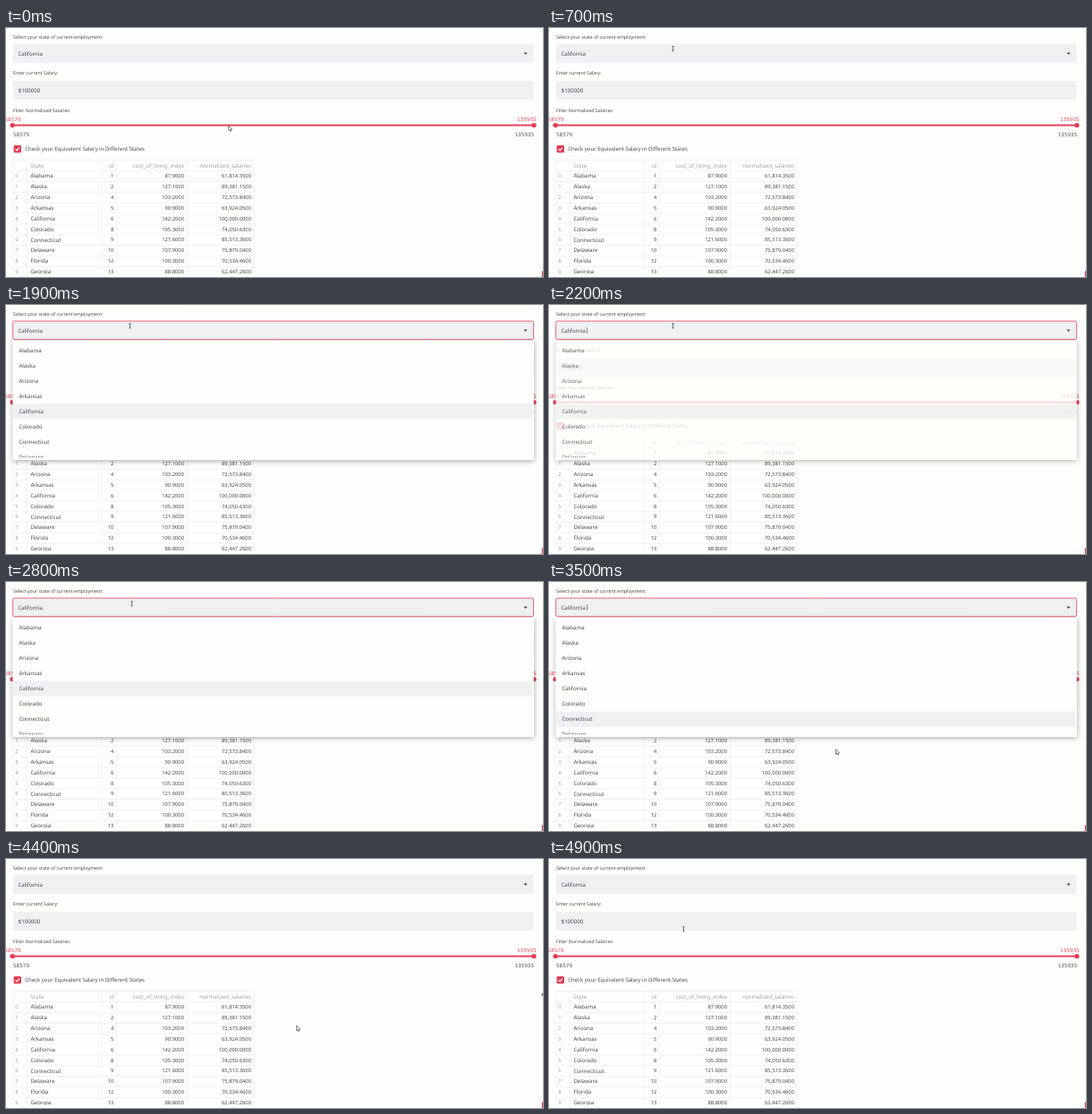
An HTML page with a canvas that plays this animation: 600x278 px, repeating every 5 s.

```html
<!DOCTYPE html>
<html lang="en">
<head>
<meta charset="utf-8">
<title>Salary comparison form</title>
<style>
  html, body { margin: 0; width: 100%; height: 100%; overflow: hidden; background: #fefefc; }
  canvas { display: block; width: 600px; height: 278px; }
</style>
</head>
<body>
<canvas id="stage" width="600" height="278"></canvas>
<script>
const ctx = document.getElementById('stage').getContext('2d');
ctx.textRendering = 'geometricPrecision';

const W = 600, H = 278, LOOP = 5000, STEP = 100;
const SANS = '"Noto Sans", "Open Sans", sans-serif';
const MONO = '"Noto Sans Mono", "DejaVu Sans Mono", monospace';
const PAGE = '#fefefc', FIELD = '#eef0f2', INK = '#484a52', FAINT = '#a0a2a7';
const LINE = '#ebecee', RED = '#e63c56';

const states = [
  ['Alabama', 1, 87.9], ['Alaska', 2, 127.1], ['Arizona', 4, 103.2],
  ['Arkansas', 5, 90.9], ['California', 6, 142.2], ['Colorado', 8, 105.3],
  ['Connecticut', 9, 121.6], ['Delaware', 10, 107.9], ['Florida', 12, 100.3],
  ['Georgia', 13, 88.8]
];
const BASE_INDEX = 142.2, SALARY = 100000, CHOSEN = 4;

// Pointer path: time, x, y
const path = [
  [0, 250, 112], [600, 138.6, 23], [2500, 138.6, 23], [2800, 140.7, 24], [2900, 146, 32],
  [3000, 165, 119], [3100, 165, 119], [3600, 340, 198], [4300, 340, 198], [4900, 150.4, 78]
];
// Menu opacity from each time on
const menuFade = [
  [0, 0], [900, 0.15], [1000, 0.6], [1100, 0.9], [1200, 1],
  [2100, 0.4], [2200, 0.8], [2300, 1], [3800, 0]
];
const MENU = { x: 7.6, y: 40, w: 582, h: 133, first: 50.5, pitch: 17.1 };

const within = (t, a, b) => t >= a && t < b;

function pointerAt(t) {
  const i = path.findIndex(p => p[0] > t);
  if (i < 0) return path[path.length - 1].slice(1);
  const [t0, x0, y0] = path[i - 1], [t1, x1, y1] = path[i];
  const u = (t - t0) / (t1 - t0), k = u * u * (3 - 2 * u);
  return [x0 + (x1 - x0) * k, y0 + (y1 - y0) * k];
}

function fadeAt(t) {
  return menuFade.filter(f => f[0] <= t).pop()[1];
}

function rect(x, y, w, h, color) {
  ctx.fillStyle = color;
  ctx.fillRect(x, y, w, h);
}

function rounded(x, y, w, h, r) {
  ctx.beginPath();
  ctx.roundRect(x, y, w, h, r);
}

function poly(points, color) {
  ctx.beginPath();
  points.forEach(([x, y]) => ctx.lineTo(x, y));
  ctx.closePath();
  ctx.fillStyle = color;
  ctx.fill();
}

// y is the middle of the capitals
function text(str, x, y, { size = 6.1, color = INK, align = 'left', font = SANS } = {}) {
  ctx.font = `${size}px ${font}`;
  ctx.textAlign = align;
  ctx.fillStyle = color;
  ctx.fillText(str, x, y + size * 0.36);
}

function field(y, h) {
  rounded(7.6, y, 582, h, 1.5);
  ctx.fillStyle = FIELD;
  ctx.fill();
}

function drawSelect(t) {
  text('Select your state of current employment:', 8, 9.7, { size: 5.26 });
  rect(0, 0, 200, 7.6, PAGE);
  field(17.8, 20.9);
  if (within(t, 900, 3900)) {
    ctx.globalAlpha = t >= 3800 ? 0.4 : 0.85;
    rounded(7.7, 18, 581.8, 20.4, 1.5);
    ctx.strokeStyle = RED;
    ctx.lineWidth = 0.9;
    ctx.stroke();
    ctx.globalAlpha = 1;
  }
  text('California', 13.4, 28.5);
  poly([[578.5, 27.6], [582.5, 27.6], [580.5, 29.8]], '#33353d');
  const caret = within(t, 900, 1500) || within(t, 2100, 2600) || within(t, 3200, 3800);
  if (caret) rect(42, 25, 0.6, 7, INK);
}

function drawSlider() {
  const mono = { size: 6, font: MONO };
  text('Filter Normalized Salaries:', 8, 91.8, { size: 5.26 });
  rect(7, 107.6, 583, 1.9, RED);
  for (const x of [7.2, 589.8]) {
    ctx.beginPath();
    ctx.arc(x, 108.6, 2.7, 0, 7);
    ctx.fillStyle = RED;
    ctx.fill();
  }
  text('58579', 7.5, 101.7, { ...mono, color: RED, align: 'center' });
  text('135935', 581.8, 101.7, { ...mono, color: RED, align: 'center' });
  text('58579', 8, 118.4, mono);
  text('135935', 590, 118.4, { ...mono, align: 'right' });
}

function drawCheckbox() {
  rounded(8.6, 131, 8.4, 8.2, 1.4);
  ctx.fillStyle = RED;
  ctx.fill();
  ctx.beginPath();
  ctx.moveTo(10.7, 135.2);
  ctx.lineTo(12.2, 136.8);
  ctx.lineTo(15, 133.4);
  ctx.strokeStyle = '#fff';
  ctx.lineWidth = 1.1;
  ctx.stroke();
  text('Check your Equivalent Salary in Different States', 21.2, 135.2, { size: 6.02 });
}

function money(n) {
  const [whole, cents] = n.toFixed(2).split('.');
  return whole.replace(/\B(?=(\d{3})+$)/g, ',') + '.' + cents + '00';
}

function drawTable() {
  const pitch = 11.9, top = 147.2;
  const head = { size: 6.2, color: FAINT }, right = { size: 5.8, align: 'right' };
  ctx.save();
  ctx.beginPath();
  ctx.rect(0, 140, W, 134.6);
  ctx.clip();
  for (let i = 0; i < 11; i++) rect(7, top + i * pitch, 270, 0.6, LINE);
  for (const x of [7, 23, 106, 123, 202, 276.6]) rect(x, top, 0.6, 130, LINE);
  text('State', 27.3, 153.3, head);
  text('id', 120.3, 153.3, { ...head, align: 'right' });
  text('cost_of_living_index', 199, 153.3, { ...head, align: 'right' });
  text('normalized_salaries', 274, 153.3, { ...head, align: 'right' });
  states.forEach(([name, id, index], i) => {
    const y = 165 + i * pitch;
    text(i, 10.3, y, { size: 5.8, color: FAINT });
    text(name, 27.4, y);
    text(id, 120.3, y, right);
    text(index.toFixed(4), 199, y, right);
    text(money(index / BASE_INDEX * SALARY), 274, y, right);
  });
  ctx.restore();
}

function drawMenu(alpha, hover) {
  const { x, y, w, h, first, pitch } = MENU;
  ctx.save();
  ctx.globalAlpha = alpha;

  // Shadow only outside the panel
  ctx.save();
  ctx.beginPath();
  ctx.rect(0, 0, W, H);
  ctx.rect(x, y, w, h);
  ctx.clip('evenodd');
  ctx.beginPath();
  ctx.rect(0, 39, W, H);
  ctx.clip();
  ctx.shadowColor = 'rgba(0,0,0,0.36)';
  ctx.shadowBlur = 6;
  ctx.shadowOffsetY = 1;
  rect(x, y, w, h, '#fff');
  ctx.restore();

  rect(x, y, w, h, PAGE);
  ctx.beginPath();
  ctx.rect(x, y, w, 130.2);
  ctx.clip();
  rect(x, first + hover * pitch - 8.5, w - 1.4, pitch, FIELD);
  states.slice(0, 8).forEach(([name], i) => text(name, 14.4, first + i * pitch));
  ctx.restore();
}

function hoverAt(t, y) {
  if (t < 3200) return CHOSEN;
  const row = Math.round((y - MENU.first) / MENU.pitch);
  return Math.min(Math.max(row, CHOSEN), 6);
}

function drawPointer(x, y, beam) {
  if (beam) {
    rect(x - 0.4, y - 2.8, 0.8, 5.8, '#4a4b50');
    rect(x - 1.4, y - 3, 2.8, 0.6, '#6a6b70');
    rect(x - 1.4, y + 2.6, 2.8, 0.6, '#6a6b70');
    return;
  }
  const a = x - 1.3, b = y - 3;
  const shape = [[0, 0], [0, 5.6], [1.3, 4.5], [2.2, 6.4], [3, 6], [2.2, 4.2], [3.9, 4]]
    .map(([dx, dy]) => [a + dx, b + dy]);
  poly(shape, '#fff');
  ctx.strokeStyle = '#44454a';
  ctx.lineWidth = 0.7;
  ctx.stroke();
}

function draw(t) {
  rect(0, 0, W, H, PAGE);
  drawSelect(t);
  text('Enter current Salary:', 8, 50.6, { size: 5.26 });
  field(59, 21);
  text('$100000', 13.6, 69.7, { size: 6.2 });
  drawSlider();
  drawCheckbox();
  drawTable();

  const [x, y] = pointerAt(t), fade = fadeAt(t);
  if (fade) drawMenu(fade, hoverAt(t, y));

  rounded(598.7, 271.2, 6, 10, 1);
  ctx.fillStyle = '#d04a60';
  ctx.fill();
  if (within(t, 3600, 4500)) poly([[598, 152.5], [600, 149.3], [600, 152.5]], '#44454a');

  drawPointer(x, y, y < 39 || (!fade && within(y, 59, 80)));
}

const start = performance.now();
function tick() {
  const t = (performance.now() - start) % LOOP;
  draw(Math.floor(t / STEP) * STEP);
  requestAnimationFrame(tick);
}
tick();
</script>
</body>
</html>
```
